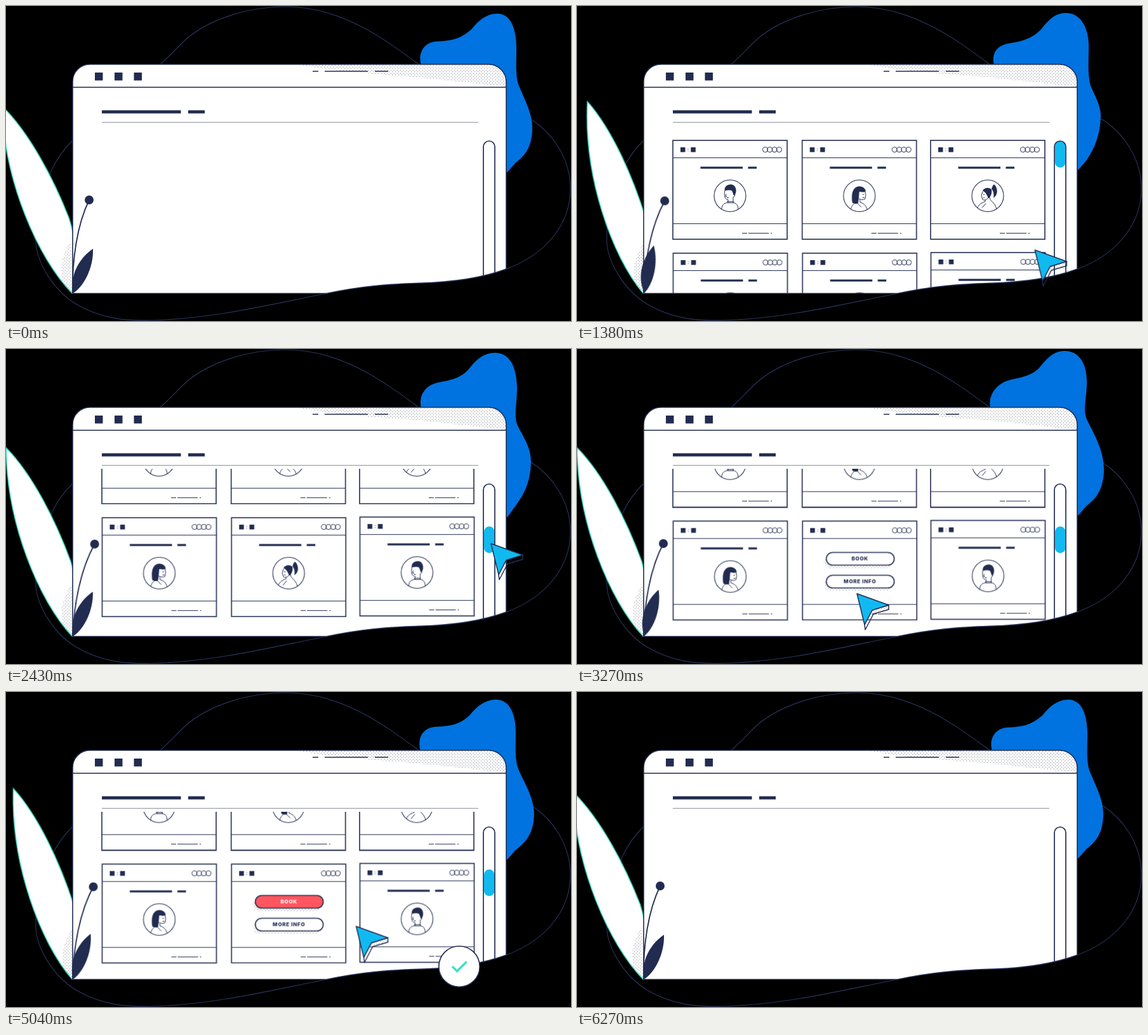
An HTML page that plays this animation: 890 px wide and 497 px high, repeating every 6.3 s.

```html
<!DOCTYPE html>
<html lang="en">
<head>
<meta charset="utf-8">
<title>Booking browser</title>
<style>
  html, body { margin: 0; width: 100%; height: 100%; overflow: hidden; background: #000; }
  svg { display: block; width: 890px; height: 497px; --navy: #222c50; --cyan: #10baf1; --teal: #3fe0c4; }
  svg * { animation: 0s cubic-bezier(.37, 0, .63, 1) infinite; }
  .solid { fill: var(--navy); }
  .line { fill: none; stroke: var(--navy); }
  .paper { fill: #fff; stroke: var(--navy); }
  .crisp { shape-rendering: crispEdges; }
  text { font: 800 8.1px Inter, "Open Sans", sans-serif; letter-spacing: .65px; text-anchor: middle; fill: var(--navy); }

  #blob { fill: #0073e0; animation: blob 6.3s linear infinite; }
  #leaf { transform-origin: 104px 453px; animation-name: leaf; animation-duration: 6.3s; }
  #stem { transform-origin: 105px 453px; animation-name: stem; animation-duration: 6.3s; }
  #sprig { transform-origin: 106px 453px; animation-name: sprig; animation-duration: 6.3s; }
  #page { animation: page 6.3s linear infinite; }
  #scroll { animation-name: scroll; animation-duration: 6.3s; }
  #thumb { fill: var(--cyan); animation-name: thumb; animation-duration: 6.3s; }
  .card { transform-origin: 90px 78px; animation: card 6.3s ease-out infinite backwards; }
  .away { animation: away 6.3s linear infinite; }
  .shown { animation: shown 6.3s linear infinite; }
  #book { animation: red 6.3s linear infinite; }
  #bookText { animation: pale 6.3s linear infinite; }
  #trail { stroke-dasharray: 40 200; animation: trail 6.3s linear infinite; }
  #badge { transform-origin: 714px 433px; animation-name: badge; animation-duration: 6.3s; }
  #disc { animation: disc 6.3s linear infinite; }
  #ring { stroke-dasharray: 100 101; animation: ring 6.3s linear infinite; }
  #tick { stroke-dasharray: 100 101; animation: tick 6.3s linear infinite; }
  #cursor { animation-name: cursor; animation-duration: 6.3s; }
  #arrow { animation: arrow 6.3s linear infinite; }

  @keyframes blob {
    0%, 94.5%, 100% { d: path("M654 94C648 72 660 57 678 56C700 55 715 53 733 37C745 22 758 12 774 12C795 12 804 36 804 66C804 90 802 110 808 126C818 150 829 170 829 192C829 225 815 238 802 248L790 262L740 280L660 130Z"); }
    21.9% { d: path("M657 94C652 72 664 62 680 59C700 56 716 52 730 38C742 23 752 11 770 11C794 11 807 36 806 66C806 90 804 106 809 126C818 146 825 158 825 174C824 206 814 226 803 243L790 258L740 280L660 130Z"); }
    38.6% { d: path("M654 94C649 72 662 57 680 53C700 49 714 47 728 33C740 17 752 6 770 6C795 6 804 30 805 60C805 86 800 104 805 119C814 138 827 154 827 178C826 216 812 234 803 247L790 265L740 280L660 130Z"); }
    51.9% { d: path("M651 94C647 72 661 56 678 50C698 44 712 45 728 30C740 14 752 3 768 3C793 3 804 26 803 56C802 82 797 96 803 111C814 134 831 160 830 194C828 226 815 238 802 248L790 262L740 280L660 130Z"); }
    68.1% { d: path("M649 94C647 72 660 56 677 52C699 47 716 49 730 34C742 19 752 9 768 9C791 9 801 30 801 58C800 82 797 95 803 109C814 134 833 160 833 192C832 226 817 238 803 248L790 264L740 280L660 130Z"); }
    80% { d: path("M653 94C647 72 657 57 675 55C699 54 715 52 731 36C743 21 756 12 772 12C793 12 803 34 803 64C803 88 801 108 808 124C818 146 831 166 832 192C831 226 817 238 802 250L790 264L740 280L660 130Z"); }
  }
  @keyframes leaf {
    0%, 100% { transform: rotate(-4.2deg); }
    21% { transform: rotate(.1deg); }
    45% { transform: rotate(-3.6deg); }
    71% { transform: rotate(.1deg); }
  }
  @keyframes stem {
    0%, 100% { transform: none; }
    33.3% { transform: rotate(3.8deg); }
    50% { transform: rotate(1.9deg); }
    66.7% { transform: rotate(3.9deg); }
  }
  @keyframes sprig {
    0%, 40%, 89%, 100% { transform: rotate(0); }
    20.5% { transform: rotate(-12.7deg); }
    62% { transform: rotate(-12deg); }
  }
  @keyframes page { 0%, 6% { opacity: 0; } 6.5%, 94.8% { opacity: 1; } 98.4%, 100% { opacity: 0; } }
  @keyframes card { 0%, 7% { opacity: 0; transform: scale(.8); } 12%, 100% { opacity: 1; transform: none; } }
  @keyframes scroll {
    0%, 28.6% { transform: none; }
    38% { transform: translateY(-124px); }
    43%, 100% { transform: translateY(-118.5px); }
  }
  @keyframes thumb {
    0%, 10% { opacity: 0; transform: none; }
    14%, 28.6% { opacity: 1; transform: none; }
    35.7%, 100% { opacity: 1; transform: translateY(67px); }
  }
  @keyframes away { 0%, 47% { opacity: 1; } 48.4%, 100% { opacity: 0; } }
  @keyframes shown { 0%, 47% { opacity: 0; } 48.4%, 100% { opacity: 1; } }
  @keyframes red { 0%, 60% { fill: #fff; } 61%, 100% { fill: #ff5660; } }
  @keyframes pale { 0%, 60% { fill: #222c50; } 61%, 100% { fill: #fff; } }
  @keyframes trail { 0%, 65% { stroke-dashoffset: 40; } 69.5%, 100% { stroke-dashoffset: -100; } }
  @keyframes ring { 0%, 68.3% { stroke-dashoffset: 100.5; } 71.5%, 100% { stroke-dashoffset: 0; } }
  @keyframes disc { 0%, 69.5% { opacity: 0; } 71.5%, 100% { opacity: 1; } }
  @keyframes tick { 0%, 71.5% { stroke-dashoffset: 100.5; } 75%, 100% { stroke-dashoffset: 0; } }
  @keyframes badge { 0%, 94.8% { transform: none; } 98.4%, 100% { transform: scale(0); } }
  @keyframes cursor {
    0%, 20% { transform: translate(703px, 425px); animation-timing-function: linear; }
    21.9% { transform: translate(721px, 386px); animation-timing-function: ease-out; }
    27%, 28.6% { transform: translate(764px, 240px); }
    35.7%, 38.9% { transform: translate(764px, 307px); }
    48.4%, 55.6% { transform: translate(441px, 386px); }
    61.9%, 75.1% { transform: translate(446px, 333.5px); }
    87%, 100% { transform: translate(736px, 433px); }
  }
  @keyframes arrow { 0%, 20% { opacity: 0; } 20.7%, 94.8% { opacity: 1; } 97%, 100% { opacity: 0; } }
</style>
</head>
<body>
<svg viewBox="0 0 890 497">
  <defs>
    <pattern id="dots" width="5" height="5" patternUnits="userSpaceOnUse">
      <g fill="#40434e"><circle cx="1.2" cy="1.2" r=".55"/><circle cx="3.7" cy="3.7" r=".55"/></g>
    </pattern>
    <path id="frame" d="M105 453.5V119A27 27 0 0 1 132 92H760A28 28 0 0 1 788 120V415C750 429 703 436 650 437.3C600 439 560 442 505 453.5Z"/>
    <clipPath id="inside"><use href="#frame"/></clipPath>
    <clipPath id="list"><rect x="140" y="189" width="605" height="300"/></clipPath>
    <clipPath id="face"><circle r="25"/></clipPath>
    <g id="man" class="line" stroke-width="1">
      <path class="paper" d="M-13 24C-14 14 -9 12 -5 11H6C11 12 13 16 13 24"/>
      <path class="paper" d="M-8 -9C-10 0 -8 6 -3 6V11H5V2C8 1 9 -4 6 -5"/>
      <path d="M-6 -3L-7 1H-5M-5 3H-2M-5 9H6"/>
      <path class="solid" stroke="none" d="M-8 -8C-10 -14 -4 -18 1 -18C8 -18 11 -11 9 -4L6 0L4 -6C3 -10 -3 -9 -8 -8Z"/>
    </g>
    <g id="bob" class="line" stroke-width="1">
      <path d="M-14 24C-13 15 -8 11 -4 11M1 6V10C7 12 11 15 13 24M-4 11L3 18"/>
      <path class="paper" d="M-2 -7H9L10 -1L9 5C6 7 2 6 -2 4"/>
      <path d="M5 -2H7M5 3H8"/>
      <path class="solid" stroke="none" d="M-11 11C-13 -3 -11 -14 0 -15C6 -15 10 -11 10 -7C6 -5 3 -6 0 -7L-1 4L-2 12C-6 13 -9 12 -11 11Z"/>
    </g>
    <g id="tail" class="line" stroke-width="1">
      <path d="M-17 20C-13 11 -6 10 -4 9V6M3 2C3 9 11 9 14 21M-9 19L-3 12"/>
      <path class="paper" d="M-8 -7L-10 0L-8 6C-4 8 0 5 2 1"/>
      <path d="M-7 -2H-5M-7 3H-5"/>
      <path class="solid" stroke="none" d="M-8 -8C-6 -13 2 -14 6 -10C7 -5 5 2 1 4C-1 0 -2 -5 -8 -8ZM6 -11C7 -14 8 -17 10 -18C14 -15 16 -7 14 -3C13 0 11 2 9 3C10 -3 9 -7 6 -11Z"/>
    </g>
  </defs>

  <path fill="none" stroke="#2a345e" stroke-width="1.1" d="M440 1C380 1 318 22 283 53C268 67 262 75 243 92L104 213C85 232 75 250 68 268C52 305 46 340 47 372C48 400 70 445 110 470C150 494 190 497 230 496C330 493 420 470 505 453.5C560 442 600 439 650 437.3C703 436 750 429 788 415C850 392 889 345 889 288C889 240 860 200 829 180L650 92C600 55 530 1 440 1Z"/>
  <path id="blob" d="M654 94L774 12L829 192L660 130Z"/>

  <g id="leaf">
    <path fill="#fff" stroke="var(--teal)" stroke-width="1.5" d="M104 453C55 395 10 270 16 151C55 195 88 270 108 335C120 385 112 430 104 453Z"/>
    <path fill="url(#dots)" d="M108 370C90 395 86 420 91 436L104 453Z"/>
  </g>

  <use href="#frame" fill="#fff"/>
  <path fill="url(#dots)" d="M462 93H760A27 27 0 0 1 787 120V127C740 123 700 117 640 112C580 108 500 101 462 93Z"/>
  <g class="solid">
    <path d="M140 105h12.5v12.5h-12.5zM171 105h12.5v12.5h-12.5zM201.5 105h12.5v12.5h-12.5z"/>
    <path d="M483 102.3h9v1.5h-9zM502 102.3h68v1.5h-68zM581 102.3h21v1.5h-21z"/>
    <path d="M151 164.5h124.5v5h-124.5zM287 164.5h26v5h-26z"/>
  </g>
  <path stroke="#8e9199" d="M151 183.5H744"/>

  <g clip-path="url(#inside)">
    <g id="page">
      <g clip-path="url(#list)"><g id="scroll"></g></g>
      <rect id="thumb" x="753" y="213" width="16.5" height="42" rx="8.2"/>
    </g>
    <rect class="line" stroke-width="1.7" x="752" y="213" width="18" height="300" rx="9"/>
    <path id="trail" class="line" stroke-width="1.8" pathLength="100" d="M640 262C690 290 745 360 747 433"/>
  </g>
  <path class="line" stroke-width="1.6" d="M105 128.3H788"/>
  <use href="#frame" class="line" stroke-width="1.6"/>

  <g id="stem">
    <path class="line" stroke-width="1.8" d="M105 453C104 400 112 345 131 306"/>
    <circle class="solid" cx="131" cy="306" r="7"/>
  </g>
  <path id="sprig" class="solid" d="M106 453C100 425 115 398 137 383C138 410 125 440 106 453Z"/>

  <g id="badge">
    <circle id="disc" fill="#fff" cx="714" cy="433.2" r="32.2"/>
    <circle id="ring" class="line" stroke-width="1.7" pathLength="100" cx="714" cy="433.2" r="32.2"/>
    <path id="tick" fill="none" stroke="var(--teal)" stroke-width="3.4" pathLength="100" d="M703 433L710.5 440.5L725.5 425.5"/>
  </g>

  <g id="cursor"><g id="arrow" stroke-width="1.5" stroke-linejoin="round">
    <path fill="url(#dots)" d="M50 18V25L26 32L18 47L24 26Z"/>
    <path class="line" d="M50 18V25L26 32L13 57L12 49L24 26Z"/>
    <path d="M0 0L50 18L24 26L12 49Z" fill="var(--cyan)" stroke="var(--navy)"/>
  </g></g>
</svg>
<script>
  const faces = ['man', 'bob', 'tail'];
  const columns = [151, 354.7, 557];
  const rows = [212, 390];

  const bar = (x, y, w, h) => `<rect class="solid" x="${x}" y="${y}" width="${w}" height="${h}"/>`;

  const pill = (y, label, ids) => `
    <rect x="33.5" y="${y + 5}" width="107" height="20" rx="10" fill="url(#dots)"/>
    <rect ${ids ? 'id="book"' : ''} class="paper" stroke-width="1.6" x="37.5" y="${y}" width="107" height="20" rx="10"/>
    <text ${ids ? 'id="bookText"' : ''} x="90.5" y="${y + 12.8}">${label}</text>`;

  const card = (col, row) => {
    const hovered = col === 1 && row === 1;
    const rings = [145.5, 152.8, 160.1, 167.4]
      .map(x => `<circle class="line" cx="${x}" cy="14.7" r="4"/>`).join('');
    return `<g transform="translate(${columns[col] + row * .5} ${rows[row] - (col === 2 ? row : 0)})">
      <g class="card" style="animation-delay:${(col + row) * 90}ms">
        <rect class="paper" stroke-width="1.6" width="180" height="156"/>
        <path class="line crisp" d="M0 27.3H180M0 131H180"/>
        ${bar(12, 11, 7.5, 7.5)}${bar(28.3, 11, 7.5, 7.5)}${bar(23.5, 13, .9, 1)}${bar(23.5, 16, .9, 1)}${rings}
        <g class="crisp">${bar(109, 146.3, 8, 1.1)}${bar(119, 146.3, 32, 1.1)}${bar(153.5, 146.3, 2.5, 1.1)}</g>
        <g class="${hovered ? 'away' : ''}">
          ${bar(43.5, 41.5, 66.5, 3.2)}${bar(118.5, 41.5, 13.5, 3.2)}
          <g transform="translate(90 87.5)">
            <g clip-path="url(#face)"><use href="#${faces[(col + row) % 3]}"/></g>
            <circle class="line" stroke-width="1.1" r="25"/>
          </g>
        </g>
        ${hovered ? `<g class="shown">${pill(49.5, 'BOOK', true)}${pill(85.5, 'MORE INFO')}</g>` : ''}
      </g></g>`;
  };

  document.getElementById('scroll').innerHTML =
    rows.flatMap((_, row) => columns.map((_, col) => card(col, row))).join('');
</script>
</body>
</html>
```
